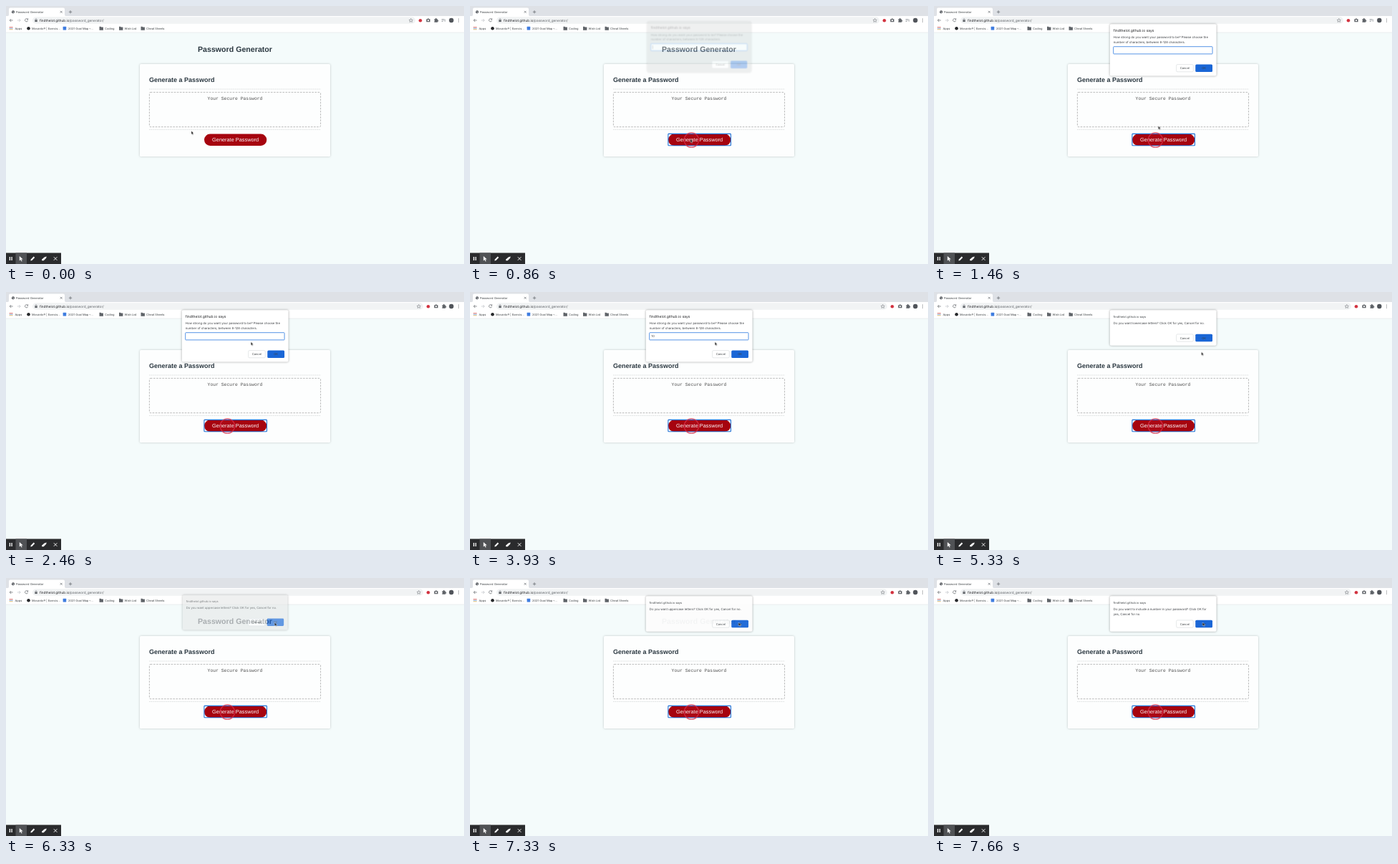
Write an HTML page that moves like this. It is 640 px wide and 360 px high and loops after 8000 ms.

```html
<!DOCTYPE html>
<html lang="en">
<head>
<meta charset="utf-8">
<title>Password Generator</title>
<style>
html, body { margin: 0; width: 100%; height: 100%; overflow: hidden; background: #f4fbfb; }
svg { display: block; width: 100vw; height: 100vh; text-rendering: geometricPrecision; }
text { font: 4px Inter, Roboto, sans-serif; fill: #3c4043; }
.arial { font-family: "Liberation Sans", Arial, sans-serif; }
.head { font-weight: 700; fill: #2b3841; }
.mono { font: 6.42px "Liberation Mono", monospace; fill: #505050; }
.url { font-size: 4.67px; fill: #5f6368; }
.mid { text-anchor: middle; }
.line { fill: none; stroke: #5f6368; stroke-width: .7; }
.card { fill: #fdfefe; filter: drop-shadow(0 .8px 1.6px rgba(0,0,0,.22)); }
.dash { fill: none; stroke: #b4b4b4; stroke-width: .9; stroke-dasharray: 2.6 1.5; }
.rule { stroke: #c9cdcd; stroke-width: .7; stroke-dasharray: .9 .7; }

/* dialogs */
.dlg { fill: #fff; transform-origin: 320px 50px; }
.panel { filter: drop-shadow(0 .8px 1.8px rgba(0,0,0,.38)); }
.dlg text { font-size: 4.28px; fill: #3a3d41; }
.dlg .site { font-size: 5px; fill: #202124; }
.dlg .ok { fill: #fff; font-weight: 500; }
.dlg .cancel { fill: #1a66d6; font-weight: 500; }

/* one loop lasts 8 s */
.dlg, .anim { animation: 8s linear infinite both; }
#d1 { animation-name: d1; }
#d2 { animation-name: d2; }
#d3 { animation-name: d3; }
#d4 { animation-name: d4; }
#pointer { animation-name: move; animation-timing-function: ease-in-out; }
#ring { animation-name: ring; }
#focus { animation-name: focus; }
#icons, #star, #pill { animation-timing-function: step-end; }
#icons, #star { animation-name: shift; }
#pill { animation-name: widen; }
#list { animation-name: drop; }
#caret { animation-name: blink; animation-timing-function: step-end; }
#one { animation-name: one; }
#zero { animation-name: zero; }
#ring, #focus, #list, #one, #zero { animation-timing-function: step-end; }

@keyframes d1 {
  0%, 9.875% { opacity: 0; fill: #b8bcbc; transform: translateY(-6px) scale(.96); animation-timing-function: steps(3); }
  12.375%, 61.6% { opacity: 1; fill: #fff; transform: none; }
  62.5%, 100% { opacity: 0; fill: #d4d8d8; transform: none; }
}
@keyframes d2 {
  0%, 64.06% { opacity: 0; fill: #b8bcbc; transform: translateY(-6px) scale(.96); animation-timing-function: steps(3); }
  66.56%, 75.4% { opacity: 1; fill: #fff; transform: none; }
  76.3%, 100% { opacity: 0; fill: #d4d8d8; transform: none; }
}
@keyframes d3 {
  0%, 77.375% { opacity: 0; fill: #b8bcbc; transform: translateY(-6px) scale(.96); animation-timing-function: steps(3); }
  79.875%, 91.6% { opacity: 1; fill: #fff; transform: none; }
  92.5%, 100% { opacity: 0; fill: #d4d8d8; transform: none; }
}
@keyframes d4 {
  0%, 93.2% { opacity: 0; fill: #b8bcbc; transform: translateY(-6px) scale(.96); animation-timing-function: steps(3); }
  95.7%, 100% { opacity: 1; fill: #fff; transform: none; }
}
@keyframes move {
  0%, .7% { transform: translate(259px, 174.3px); }
  7.5%, 15.7% { transform: translate(308px, 185.6px); }
  25%, 53.2% { transform: translate(342.2px, 69.6px); }
  60%, 70.7% { transform: translate(373.6px, 83.6px); }
  75%, 100% { transform: translate(375.4px, 62px); }
}
@keyframes ring { 0% { opacity: 0; } 7.5%, 100% { opacity: 1; } }
@keyframes focus { 0% { opacity: 0; } 8.25%, 100% { opacity: 1; } }
@keyframes shift { 0% { transform: none; } 20%, 100% { transform: translateX(11px); } }
@keyframes widen { 0% { width: 535px; } 20%, 100% { width: 546px; } }
@keyframes drop { 0% { opacity: 1; } 20%, 100% { opacity: 0; } }
@keyframes blink {
  0% { opacity: 1; transform: none; }
  17.5% { opacity: 0; }
  24.1% { opacity: 1; }
  30.75% { opacity: 0; }
  37.5% { opacity: 1; transform: none; }
  42.5% { opacity: 1; transform: translateX(2px); }
  45% { opacity: 1; transform: translateX(4.8px); }
  49.1% { opacity: 0; transform: translateX(4.8px); }
  53.25%, 100% { opacity: 1; transform: translateX(4.8px); }
}
@keyframes one { 0% { opacity: 0; } 42.5%, 100% { opacity: 1; } }
@keyframes zero { 0% { opacity: 0; } 45%, 100% { opacity: 1; } }
</style>
</head>
<body>
<svg viewBox="0 0 640 360" preserveAspectRatio="none">
  <defs>
    <path id="folder" d="M0 0h2l.7.8H5.4V5H0z" fill="#5f6368"/>
    <g id="buttons">
      <rect x="338.7" y="58.9" width="23.6" height="10.2" rx="1.5" fill="#fff" stroke="#d4d7db" stroke-width=".6"/>
      <text class="cancel mid" x="350.4" y="65.6">Cancel</text>
      <rect x="365.3" y="58.7" width="23.8" height="10.6" rx="1.5" fill="#1a66d6"/>
      <text class="ok mid" x="377.2" y="65.6">OK</text>
    </g>
    <g id="confirm">
      <rect class="panel" x="245.8" y="25.3" width="148.8" height="49.5" rx="2"/>
      <text class="site" x="250.8" y="35.8">findthelot.github.io says</text>
      <use href="#buttons"/>
    </g>
  </defs>

  <!-- browser -->
  <rect width="640" height="37" fill="#fff"/>
  <path d="M0 0H640V14H83.500Q82 14 82 12V4.500Q82 2.500 80 2.500H6Q4 2.500 4 4.500V12Q4 14 2.500 14H0z" fill="#dee1e6"/>
  <circle cx="10" cy="8.300" r="2.100" fill="#4d5156"/>
  <path d="M8.300 7.500q1.500 1.200 3.300.4M9.700 10.200q.2-1.200 1.800-1" stroke="#fff" stroke-width=".5" fill="none"/>
  <text x="14" y="9.700">Password Generator</text>
  <path class="line" d="M75.800 6.900l2.800 2.800m0-2.800l-2.800 2.800M90 6.100v4.400M87.800 8.300h4.400"/>
  <path class="line" d="M9.600 20H5.200m2-2l-2 2 2 2"/>
  <path class="line" d="M15.800 20h4.400m-2-2l2 2-2 2" style="stroke:#bdc1c6"/>
  <path class="line" d="M30.300 18.500a2.100 2.100 0 1 0 .3 2M30.700 17.300v1.700H29"/>
  <rect id="pill" class="anim" x="37" y="15.300" width="535" height="9.400" rx="4.700" fill="#f1f3f4"/>
  <path d="M40.300 19.400h3.400v2.700h-3.400z" fill="#5f6368"/>
  <path class="line" d="M41 19.500v-.8a1 1 0 0 1 2 0v.8" style="stroke-width:.5"/>
  <text class="url" x="47" y="21.700"><tspan fill="#202124">findthelot.github.io</tspan>/password_generator/</text>
  <path id="star" class="anim line" d="M565.800 17.500l.8 1.700 1.800.2-1.300 1.200.4 1.800-1.700-.9-1.700.9.4-1.800-1.300-1.200 1.800-.2z" style="stroke-width:.5"/>
  <g id="icons" class="anim" fill="#5f6368">
    <circle cx="579" cy="20.200" r="2.300" fill="#d23340"/>
    <path d="M587.400 18.300h1.300l.5-.8h1.600l.5.8h1.300V22.300h-5.200z"/>
    <circle cx="590" cy="20.200" r="1.100" fill="#fff"/>
    <path d="M598.500 18.300h1.500a.9.900 0 1 1 1.700 0h1.500v1.500a.9.900 0 1 1 0 1.700v1.300h-4.700v-1.400a.9.900 0 0 0 0-1.600z"/>
  </g>
  <path id="list" class="anim line" d="M608.700 18.500h3.800M608.700 20h3.800M608.700 21.500h2M613.400 18.500v3.400" style="stroke:#8f9398"/>
  <circle cx="622.300" cy="20" r="3.200" fill="#50545a"/>
  <path d="M632.500 18v.01M632.500 20v.01M632.500 22v.01" stroke="#5f6368" stroke-width="1.100" stroke-linecap="round"/>

  <!-- bookmarks -->
  <g stroke-width="1.050" stroke-dasharray="1.050 .55">
    <path d="M5 29.600h4.300" stroke="#db4a3d"/>
    <path d="M5 31.200h4.300" stroke="#4a86d8"/>
    <path d="M5 32.800h4.300" stroke="#d6a532"/>
  </g>
  <text x="12.500" y="32.700">Apps</text>
  <circle cx="31.500" cy="31.200" r="2.300" fill="#26282b"/>
  <text x="36" y="32.700">Movanto® | Exercis...</text>
  <rect x="79.600" y="28.800" width="4.600" height="4.800" rx=".5" fill="#3f7de0"/>
  <text x="87" y="32.700">2021 Goal Map –...</text>
  <use href="#folder" x="130.500" y="28.800"/>
  <text x="138" y="32.700">Coding</text>
  <use href="#folder" x="158" y="28.800"/>
  <text x="165.500" y="32.700">Wish List</text>
  <use href="#folder" x="188.500" y="28.800"/>
  <text x="196" y="32.700">Cheat Sheets</text>
  <path d="M0 37H640" stroke="#dfe3e5" stroke-width=".6"/>

  <!-- page -->
  <text class="arial head mid" x="320" y="63.900" style="font-size:10.63px">Password Generator</text>
  <rect class="card" x="187" y="81" width="266" height="129" rx="1.500"/>
  <text class="arial head" x="200" y="106" style="font-size:9px">Generate a Password</text>
  <path class="rule" d="M200 116H440M200 172.500H440"/>
  <rect class="dash" x="200.400" y="120.400" width="239.200" height="48.300" rx="1.500"/>
  <text class="mono mid" x="320" y="131.200">Your Secure Password</text>
  <rect x="277" y="178.500" width="87.300" height="16.500" rx="8.250" fill="#a6040f"/>
  <text class="arial mid" x="320.600" y="189.200" style="font-size:7.36px;fill:#fff">Generate Password</text>
  <rect id="focus" class="anim" x="276.900" y="178.400" width="87.600" height="16.400" rx=".8" fill="none" stroke="#1c6fd4" stroke-width="1.100"/>
  <circle id="ring" class="anim" cx="309.400" cy="187" r="10.200" fill="#d8304a" fill-opacity=".1" stroke="#d8304a" stroke-opacity=".8" stroke-width="1.300"/>

  <!-- dialogs -->
  <g id="d1" class="dlg">
    <rect class="panel" x="245.800" y="25.300" width="148.800" height="72.200" rx="2"/>
    <text class="site" x="250.800" y="35.800">findthelot.github.io says</text>
    <text x="250.800" y="45.300">How strong do you want your password to be? Please choose the</text>
    <text x="250.800" y="51.900">number of characters, between 8-128 characters.</text>
    <rect x="250.700" y="56.700" width="138.400" height="10.200" rx=".7" fill="#fff" stroke="#4489e4" stroke-width=".9"/>
    <text id="one" class="anim" x="253.300" y="63.300">1</text>
    <text id="zero" class="anim" x="255.200" y="63.300">0</text>
    <rect id="caret" class="anim" x="253.300" y="59.200" width=".5" height="5.200" fill="#333"/>
    <use href="#buttons" y="22.700"/>
  </g>
  <g id="d2" class="dlg">
    <use href="#confirm"/>
    <text x="250.800" y="45.300">Do you want lowercase letters? Click OK for yes, Cancel for no.</text>
  </g>
  <g id="d3" class="dlg">
    <use href="#confirm"/>
    <text x="250.800" y="45.300">Do you want uppercase letters? Click OK for yes, Cancel for no.</text>
  </g>
  <g id="d4" class="dlg">
    <use href="#confirm"/>
    <text x="250.800" y="45.300">Do you want to include a number in your password? Click OK for</text>
    <text x="250.800" y="51.900">yes, Cancel for no.</text>
  </g>

  <!-- recorder bar -->
  <rect y="344.500" width="77" height="15.500" fill="#2a2b2d"/>
  <rect x="13.500" y="344.500" width="15.500" height="15.500" fill="#505255"/>
  <g fill="#fff">
    <path d="M4.700 349.900h1.300v5.200H4.700zM7.400 349.900h1.300v5.200H7.400z"/>
    <path d="M18.800 348.900l4.900 4.500-2.300.2 1.200 2.500-1 .4-1.100-2.500-1.700 1.500z"/>
    <path d="M34.300 355.500l.5-2 3.900-3.900 1.500 1.500-3.900 3.900z"/>
    <path d="M50 353.800l3.600-3.400 3.100-.8-.6 2.200-3.500 3.400-2.300.1z"/>
  </g>
  <path d="M66.800 350.200l4.600 4.600m0-4.600l-4.600 4.600" stroke="#fff" stroke-width=".9"/>

  <path id="pointer" class="anim" d="M0 0V4.800L1.100 3.800 1.900 5.500 2.800 5.100 2 3.400H3.500z" fill="#111" stroke="#fff" stroke-width=".4"/>
</svg>
</body>
</html>
```
